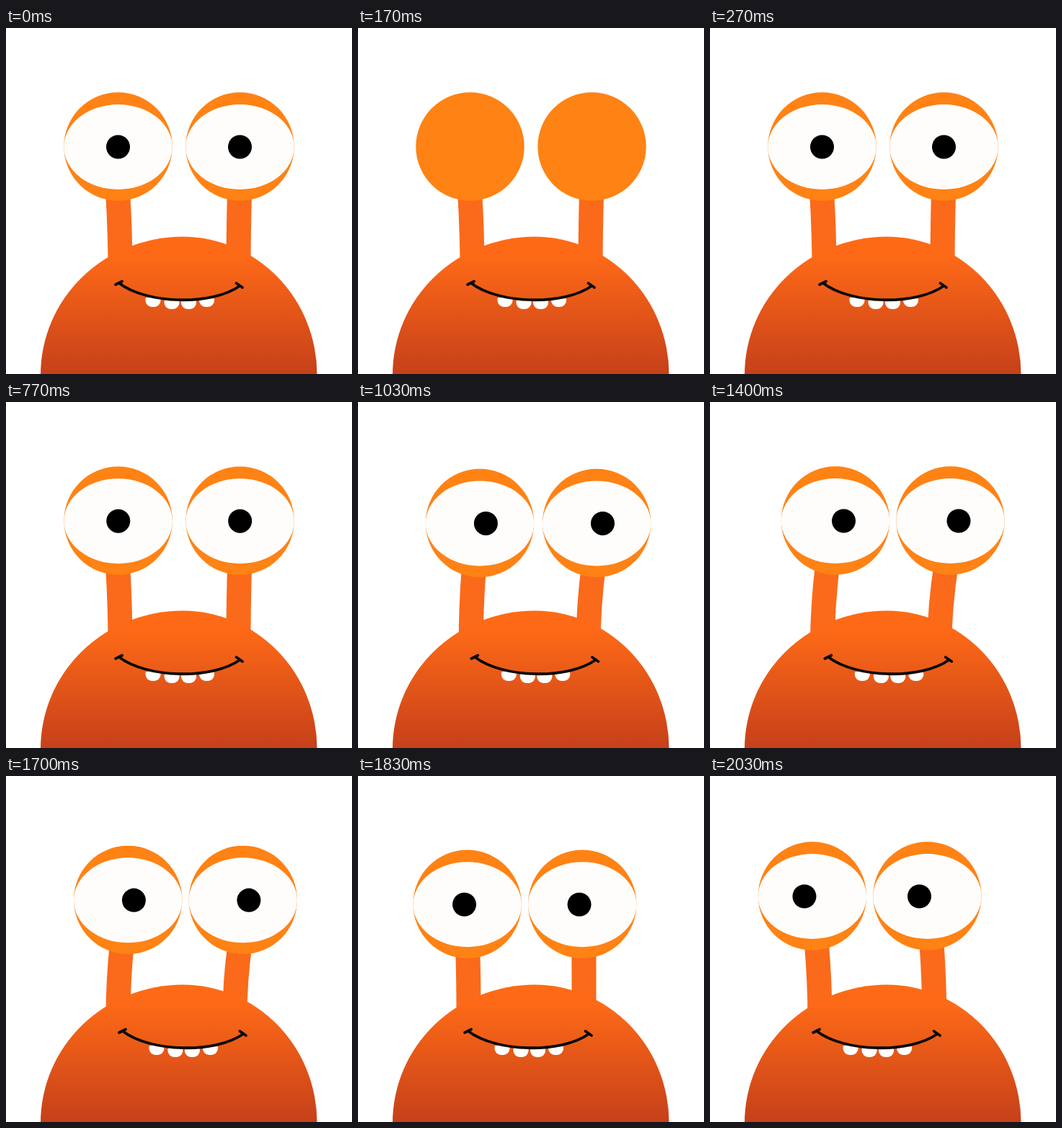
An HTML page with a canvas for the animation above (2.06 s loop, 480 px wide and 480 px high).

```html
<!DOCTYPE html>
<html lang="en">
<head>
<meta charset="utf-8">
<title>Orange monster</title>
<style>
  html, body { margin: 0; width: 100%; height: 100%; overflow: hidden; background: #fff; }
  canvas { display: block; }
</style>
</head>
<body>
<canvas id="stage" width="480" height="480"></canvas>
<script>
const c = document.getElementById('stage').getContext('2d');
const LOOP = 2060, EYE_Y = 164.5, EYE_R = 75.2;

// left eye, stalk top, stalk base; the same for the right; pupil offset; mouth offset
const REST  = [155.5, 155, 158.5, 324.5, 324, 322.5, 0, 0];
const RIGHT = [174, 163, 156, 333.5, 327.5, 318.5, 11.5, 7.3];
const LEFT  = [140.8, 147, 152.3, 300.3, 306.5, 311, -11.8, -9.5];

const skin = c.createLinearGradient(0, 289, 0, 480);
skin.addColorStop(0, '#ff6a14');
skin.addColorStop(0.15, '#fd6917');
skin.addColorStop(1, '#c6401a');

const clamp = v => Math.min(1, Math.max(0, v));
const mix = (a, b, p) => a.map((v, i) => v + (b[i] - v) * p);

// cubic-bezier(.33, 0, .2, 1)
function ease(u) {
  u = clamp(u);
  let lo = 0, hi = 1;
  for (let i = 0; i < 20; i++) {
    const s = (lo + hi) / 2, r = 1 - s;
    if (0.99 * r * r * s + 0.6 * r * s * s + s * s * s < u) lo = s; else hi = s;
  }
  return lo * lo * (3 - 2 * lo);
}

function oval(x, y, rx, ry, fill) {
  c.fillStyle = fill;
  c.beginPath();
  c.ellipse(x, y, rx, ry, 0, 0, 7);
  c.fill();
}

function stalk(top, base, y) {
  c.strokeStyle = '#fa6a1a';
  c.lineWidth = 34;
  c.lineCap = 'butt';
  c.beginPath();
  c.moveTo(base, 335);
  c.quadraticCurveTo(base, 285, top, y + 62);
  c.stroke();
}

// a dome whose apex sits a little right of the middle
function body() {
  c.fillStyle = skin;
  c.beginPath();
  c.ellipse(245, 481, 197, 191.5, 0, Math.PI, Math.PI * 1.5);
  c.ellipse(245, 481, 186.5, 191.5, 0, -Math.PI / 2, 0);
  c.fill();
}

function eye(x, y, look, open) {
  oval(x, y, EYE_R, EYE_R, '#ff8214');
  if (!open) return;
  c.save();
  oval(x, y + 0.5, EYE_R, 59 * open, '#fefdfc');
  c.clip();
  oval(x + look, y + 0.5, 16.5, 16.5, '#000');
  c.restore();
}

function mouth(shift) {
  c.save();
  c.translate(shift, 0);
  c.fillStyle = '#fff';
  for (const [x, y] of [[204, 374], [230, 377], [253.5, 377], [278.5, 374]]) {
    c.beginPath();
    c.roundRect(x - 10.5, y, 21, 13, [2, 2, 9, 9]);
    c.fill();
  }
  c.strokeStyle = '#0a0a0a';
  c.lineWidth = 3.8;
  c.lineCap = 'round';
  c.stroke(new Path2D('M157 354C195 383 285 385.5 324 358M152 356L161 351.5M319.5 354L328 360'));
  c.restore();
}

function draw(frame) {
  const toRight = ease((frame - 22) / 20), toLeft = ease((frame - 48) / 17);
  const [eyeL, topL, baseL, eyeR, topR, baseR, look, shift] =
    mix(mix(REST, RIGHT, toRight), LEFT, toLeft);
  const dip = 4.3 * 4 * toRight * (1 - toRight) + 15 * 4 * toLeft * (1 - toLeft);
  const y = EYE_Y + dip;
  const open = clamp((Math.abs(frame - 4) - 1) / 3); // blink

  c.fillStyle = '#fff';
  c.fillRect(0, 0, 480, 480);
  stalk(topL, baseL, y);
  stalk(topR, baseR, y);
  body();
  mouth(shift);
  eye(eyeL, y, look, open);
  eye(eyeR, y, look, open);
}

function tick() {
  // the motion advances at 30 steps per second
  draw(Math.floor((performance.now() % LOOP + 4) * 0.03));
  requestAnimationFrame(tick);
}
tick();
</script>
</body>
</html>
```
